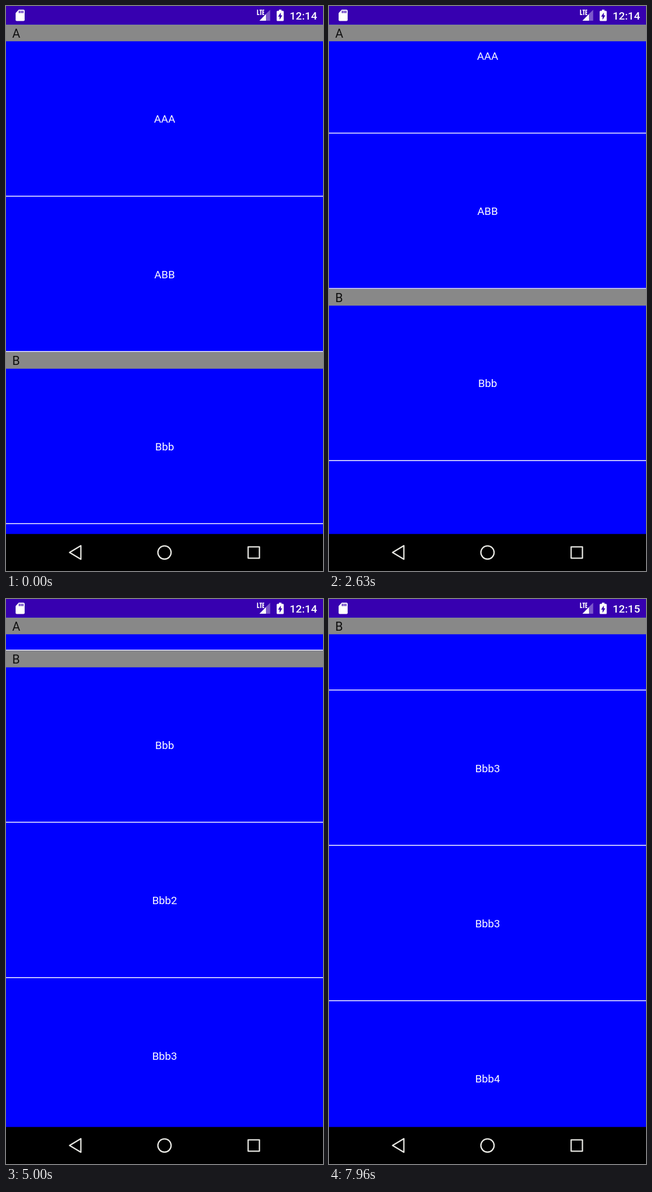
An HTML page for the animation above (8000 ms loop, 561 by 998 pixels).

```html
<!DOCTYPE html>
<html lang="en">
<head>
<meta charset="utf-8">
<title>Sticky section headers</title>
<style>
  html, body { margin: 0; width: 100%; height: 100%; overflow: hidden; background: #00f; }
  svg { display: block; width: 100vw; height: 100vh; }
  text { font-family: Roboto, sans-serif; }
  .label { font-size: 19.1px; fill: #fff; text-anchor: middle; }
  .title { font-size: 21.8px; fill: #101010; }
  .clock { font-size: 19.1px; font-weight: 500; fill: #fff; text-anchor: end; }
</style>
</head>
<body>
<svg viewBox="0 0 561 998">
  <rect width="561" height="998" fill="#00f"/>
  <g id="list"></g>
  <g id="headers"></g>

  <rect width="561" height="32.7" fill="#3700b0"/>
  <path fill="#fff" d="M22.5 6.5H31q2 0 2 2V24.500q0 2-2 2H19q-2 0-2-2V12.500z"/>
  <path stroke="#3700b0" stroke-width="1.8" d="M23.600 8.600v4M26.700 8.600v4M29.800 8.600v4"/>
  <path fill="none" stroke="#fff" stroke-width="1.8" d="M445.200 6.500v8.600h3.200M448.600 7.400h4.400M450.800 7.400v8.600M457 7.400h-2.500v7.700h2.500M454.500 11.200h2.200"/>
  <path fill="#fff" fill-opacity=".35" d="M460 14L467.500 6.700V26H460z"/>
  <path fill="#fff" d="M448.500 26L460 14.300V26z"/>
  <path fill="#fff" d="M483 6.500h4.500v2H490q1.500 0 1.500 1.500V25q0 1.500-1.500 1.500h-9.500q-1.500 0-1.500-1.500V10q0-1.500 1.500-1.500h2.500z"/>
  <path fill="#3700b0" d="M486.300 11.500v5h2.700l-4.800 8v-5.800h-2.700z"/>
  <text id="clock" class="clock" x="550.5" y="23.700">12:14</text>

  <rect y="932.6" width="561" height="65.4"/>
  <g fill="none" stroke="#e9e9e4" stroke-width="2.3" stroke-linejoin="round">
    <path d="M112.500 965.300L132.500 953.300V977.300z"/>
    <circle cx="280.500" cy="965.300" r="11.700"/>
    <rect x="428.500" y="955.300" width="20" height="20"/>
  </g>
</svg>
<script>
const LOOP = 8000, TOP = 32.7, HEADER = 29.6, ROW = 274.4, RULE = 1.5;
const sections = [
  { title: 'A', rows: ['AAA', 'ABB'] },
  { title: 'B', rows: ['Bbb', 'Bbb2', 'Bbb3', 'Bbb3', 'Bbb4'] }
];

// [time, scroll offset]
const scroll = [
  [0, 0], [2270, 0], [2630, 111], [2850, 265], [3080, 360],
  [3670, 360], [4150, 440], [4700, 520], [6000, 520],
  [6450, 540], [6840, 562], [7200, 800], [7600, 1005], [7940, 1028], [LOOP, 1028]
];

const byId = id => document.getElementById(id);

function add(parent, tag, attrs, text = '') {
  const el = document.createElementNS('http://www.w3.org/2000/svg', tag);
  for (const key in attrs) el.setAttribute(key, attrs[key]);
  el.textContent = text;
  return parent.appendChild(el);
}

function build() {
  let y = TOP;
  for (const section of sections) {
    section.y = y;
    section.header = add(byId('headers'), 'g', {});
    add(section.header, 'rect', { width: 561, height: HEADER, fill: '#888' });
    add(section.header, 'text', { class: 'title', x: 10.9, y: 23.4 }, section.title);
    y += HEADER;
    for (const name of section.rows) {
      add(byId('list'), 'text', { class: 'label', x: 280.7, y: y + 144 }, name);
      y += ROW;
      add(byId('list'), 'rect', { y: y - RULE, width: 561, height: RULE, fill: '#fff' });
    }
  }
}

const slope = i => (scroll[i + 1][1] - scroll[i][1]) / (scroll[i + 1][0] - scroll[i][0]);

// Harmonic mean keeps the curve monotone through every point.
function tangent(i) {
  if (i === 0 || i === scroll.length - 1) return 0;
  const a = slope(i - 1), b = slope(i);
  return a * b > 0 ? 2 * a * b / (a + b) : 0;
}

function offsetAt(time) {
  let i = 0;
  while (time >= scroll[i + 1][0]) i++;
  const [t0, y0] = scroll[i], [t1, y1] = scroll[i + 1];
  const span = t1 - t0, u = (time - t0) / span, v = 1 - u;
  return y0 * v * v * (1 + 2 * u) + y1 * u * u * (3 - 2 * u)
    + span * u * v * (v * tangent(i) - u * tangent(i + 1));
}

function draw(time) {
  const offset = offsetAt(time);
  byId('list').setAttribute('transform', `translate(0 ${-offset})`);
  sections.forEach((section, i) => {
    const next = sections[i + 1];
    const limit = next ? next.y - offset - HEADER : Infinity;
    const y = Math.min(Math.max(TOP, section.y - offset), limit);
    section.header.setAttribute('transform', `translate(0 ${y})`);
  });
  byId('clock').textContent = time < 6000 ? '12:14' : '12:15';
}

function tick() {
  draw((performance.now() - start) % LOOP);
  requestAnimationFrame(tick);
}

build();
const start = performance.now();
tick();
</script>
</body>
</html>
```
